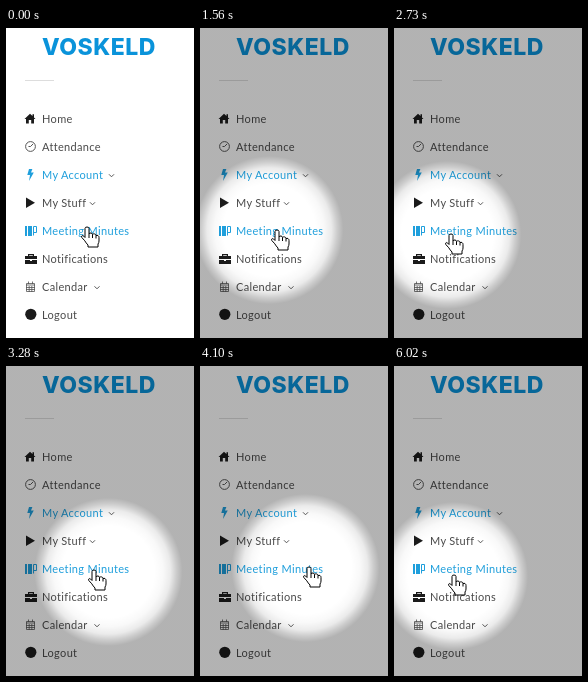
An HTML page for the animation above (7.02 s loop, 188x310 px).

```html
<!DOCTYPE html>
<html lang="en">
<head>
<meta charset="utf-8">
<title>Menu spotlight</title>
<style>
  html, body { margin: 0; width: 100%; height: 100%; overflow: hidden; background: #fff; }
  svg { display: block; width: 188px; height: 310px; }
  .brand { font: 800 23px Inter, sans-serif; letter-spacing: .5px; fill: #0a93da; }
  .menu { font: 400 11px Lato, sans-serif; letter-spacing: .33px; fill: #4a4a4a; }
  .menu .active { fill: #1f9fdc; }
  .line { fill: none; stroke: #555; stroke-width: 1; }
  .active .line { stroke: #1f9fdc; }
  .solid { fill: #1b1b1b; }
</style>
</head>
<body>
<svg viewBox="0 0 188 310">
  <defs>
    <radialGradient id="spot" gradientUnits="userSpaceOnUse" r="74">
      <stop offset=".62" stop-opacity="0"/>
      <stop offset=".74" stop-opacity=".025"/>
      <stop offset=".84" stop-opacity=".08"/>
      <stop offset=".92" stop-opacity=".2"/>
      <stop offset="1" stop-opacity=".3"/>
    </radialGradient>
    <path id="chevron" class="line" d="M-2.5-1.2 0 1.3 2.5-1.2"/>
  </defs>

  <rect width="188" height="310" fill="#fff"/>
  <text class="brand" x="36" y="27">VOSKELD</text>
  <path d="M19 52.5H48" stroke="#ddd"/>

  <g class="menu">
    <g>
      <path class="solid" d="M18.5 91 24 85.8 26.5 88V86.3H28V89.5L29.5 91H28V95.5H25.2V92H22.8V95.5H20V91Z"/>
      <text x="36" y="95">Home</text>
    </g>
    <g>
      <circle class="line" cx="24.5" cy="118.5" r="4.9"/>
      <path class="line" d="M22.5 118.5H24.5L27 116"/>
      <text x="36" y="123">Attendance</text>
    </g>
    <g class="active">
      <path d="M23 141H26.4L25 144.6H27.8L23 153 24 147H21.3Z"/>
      <text x="36" y="151">My Account</text>
      <use href="#chevron" x="105.5" y="147.5"/>
    </g>
    <g>
      <path class="solid" d="M20 169.5 29 174.8 20 180Z"/>
      <text x="36" y="179">My Stuff</text>
      <use href="#chevron" x="86.5" y="175.5"/>
    </g>
    <g class="active">
      <path d="M19 198H21V208H19ZM22 198H26V208H22Z"/>
      <path class="line" d="M27.5 207.5V198.5H30.5V204.5H28"/>
      <text x="36" y="207">Meeting Minutes</text>
    </g>
    <g>
      <path class="solid" d="M19 228H22V226H28V228H31V231H19ZM23.2 227.2V228H26.8V227.2ZM19 232H24V233H26V232H31V236H19Z"/>
      <text x="36" y="235">Notifications</text>
    </g>
    <g>
      <path class="line" d="M20.5 255.5H28.5V263.5H20.5ZM20 257H29M20 259.5H29M20 261.5H29M23.2 258V264M25.8 258V264M22.5 253.5V256M26.5 253.5V256" style="stroke-width:.8"/>
      <text x="36" y="263">Calendar</text>
      <use href="#chevron" x="91" y="259.5"/>
    </g>
    <g>
      <circle class="solid" cx="24.8" cy="286.3" r="5.6"/>
      <text x="36" y="291">Logout</text>
    </g>
  </g>

  <rect id="shade" width="188" height="310" fill="url(#spot)"/>

  <g id="hand" fill="#fff" stroke="#000" stroke-linejoin="round">
    <path d="M-2 1.5Q-2 0 0 0T2 1.5V7Q2.5 5.8 4 6Q5.5 6.2 5.5 7.6Q6.2 6.6 7.5 6.9Q9 7.2 9 8.6Q10 8 11 8.5Q12 9 12 10.5V14Q12 15.5 11 17V20H1V18Q-1 16-2.2 13.8L-5.2 10.5Q-6 9-4.8 8.6Q-3.5 8.4-2 10.5Z"/>
    <path fill="none" d="M2 7V11M5.5 7.6V11M9 8.6V11.5"/>
  </g>
</svg>

<script>
const LOOP = 7020;
const STEP = 133.3;       // the picture advances in steps of this length
const FIRST_MOVE = 747;   // a step boundary
const HAND_LEAD = 70;     // the light trails the hand by this much

// turning points of the sweep, with eased motion between them
const turns = [
  { at: 530, x: 81, y: 200 },
  { at: 1180, x: 46, y: 200 },
  { at: 2110, x: 115, y: 206 },
  { at: 2590, x: 53, y: 207 },
  { at: 3147, x: 115, y: 207 },
  { at: 3580, x: 56, y: 202 },
  { at: 4180, x: 109, y: 202 },
  { at: 4640, x: 42, y: 214 },
  { at: 5280, x: 60, y: 210 }
];

const spot = document.getElementById('spot');
const shade = document.getElementById('shade');
const hand = document.getElementById('hand');

const clamp = v => Math.min(1, Math.max(0, v));
const ease = p => (1 - Math.cos(Math.PI * p)) / 2;

function sweep(t) {
  const next = turns.findIndex(turn => turn.at > t);
  const b = turns.at(next);
  const a = turns[next - 1] ?? b;
  const p = ease(clamp((t - a.at) / (b.at - a.at || 1)));
  return [a.x + (b.x - a.x) * p, a.y + (b.y - a.y) * p];
}

function draw() {
  const t = performance.now() % LOOP;
  const stepped = FIRST_MOVE + Math.floor((t - FIRST_MOVE) / STEP) * STEP;
  const [lightX, lightY] = sweep(stepped);
  const [handX, handY] = sweep(stepped + HAND_LEAD);
  spot.setAttribute('cx', lightX);
  spot.setAttribute('cy', lightY);
  hand.setAttribute('transform', `translate(${Math.round(handX)} ${Math.round(handY) - 1})`);
  shade.setAttribute('opacity', clamp(Math.ceil((t - 19) / 130) / 4));
  requestAnimationFrame(draw);
}
draw();
</script>
</body>
</html>
```
